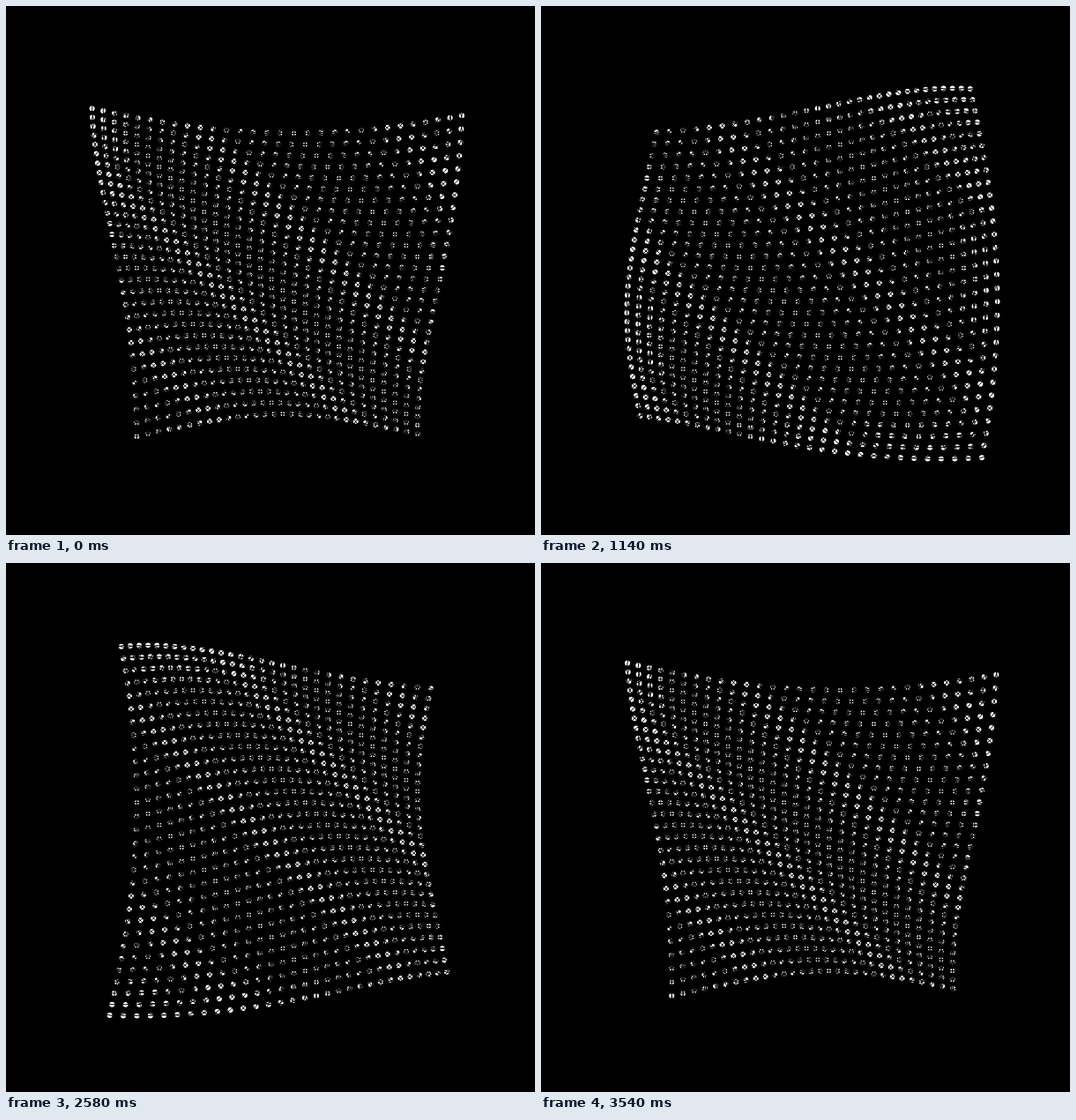
Write an HTML page that moves like this. It is 600 by 600 pixels and loops after 3600 ms.

```html
<!DOCTYPE html>
<html lang="en">
<head>
<meta charset="utf-8">
<title>Orbiting dots</title>
<style>
  html, body { margin: 0; width: 100%; height: 100%; overflow: hidden; background: #000; }
  svg { display: block; width: 600px; height: 600px; }
</style>
</head>
<body>
<svg viewBox="0 0 600 600">
  <rect width="600" height="600" fill="#000"/>
  <g id="dots" fill="#fff"></g>
  <g id="orbits" fill="none" stroke="#000" stroke-width="1"></g>
</svg>
<script>
const COUNT = 30, GAP = 12.73, ORBIT = 2 * GAP, DOT = 3;
const CX = 307.5, CY = 303.5;
const STEP = 60, STEPS = 60;
const TURN = Math.PI * 2;

function addCircle(parent, x, y, r) {
  const c = document.createElementNS("http://www.w3.org/2000/svg", "circle");
  c.setAttribute("cx", x.toFixed(2));
  c.setAttribute("cy", y.toFixed(2));
  c.setAttribute("r", r);
  parent.appendChild(c);
  return c;
}

const dotLayer = document.getElementById("dots");
const orbitLayer = document.getElementById("orbits");
const dots = [];

for (let row = 0; row < COUNT; row++) {
  for (let col = 0; col < COUNT; col++) {
    const x = CX + (col - (COUNT - 1) / 2) * GAP;
    const y = CY + (row - (COUNT - 1) / 2) * GAP;
    // The black orbits lie over the dots and cut thin lines into them.
    addCircle(orbitLayer, x, y, ORBIT);
    dots.push({ x, y, phase: 31 + row - col, el: addCircle(dotLayer, x, y, DOT) });
  }
}

let shown = -1;

function draw(ms) {
  const step = Math.floor(ms / STEP) % STEPS;
  if (step === shown) return;
  shown = step;
  for (const d of dots) {
    const a = (d.phase - step) / STEPS * TURN;
    d.el.setAttribute("cx", (d.x + ORBIT * Math.cos(a)).toFixed(2));
    d.el.setAttribute("cy", (d.y + ORBIT * Math.sin(a)).toFixed(2));
  }
}

const start = performance.now();

function tick() {
  draw(Math.max(0, performance.now() - start));
  requestAnimationFrame(tick);
}

tick();
</script>
</body>
</html>
```
